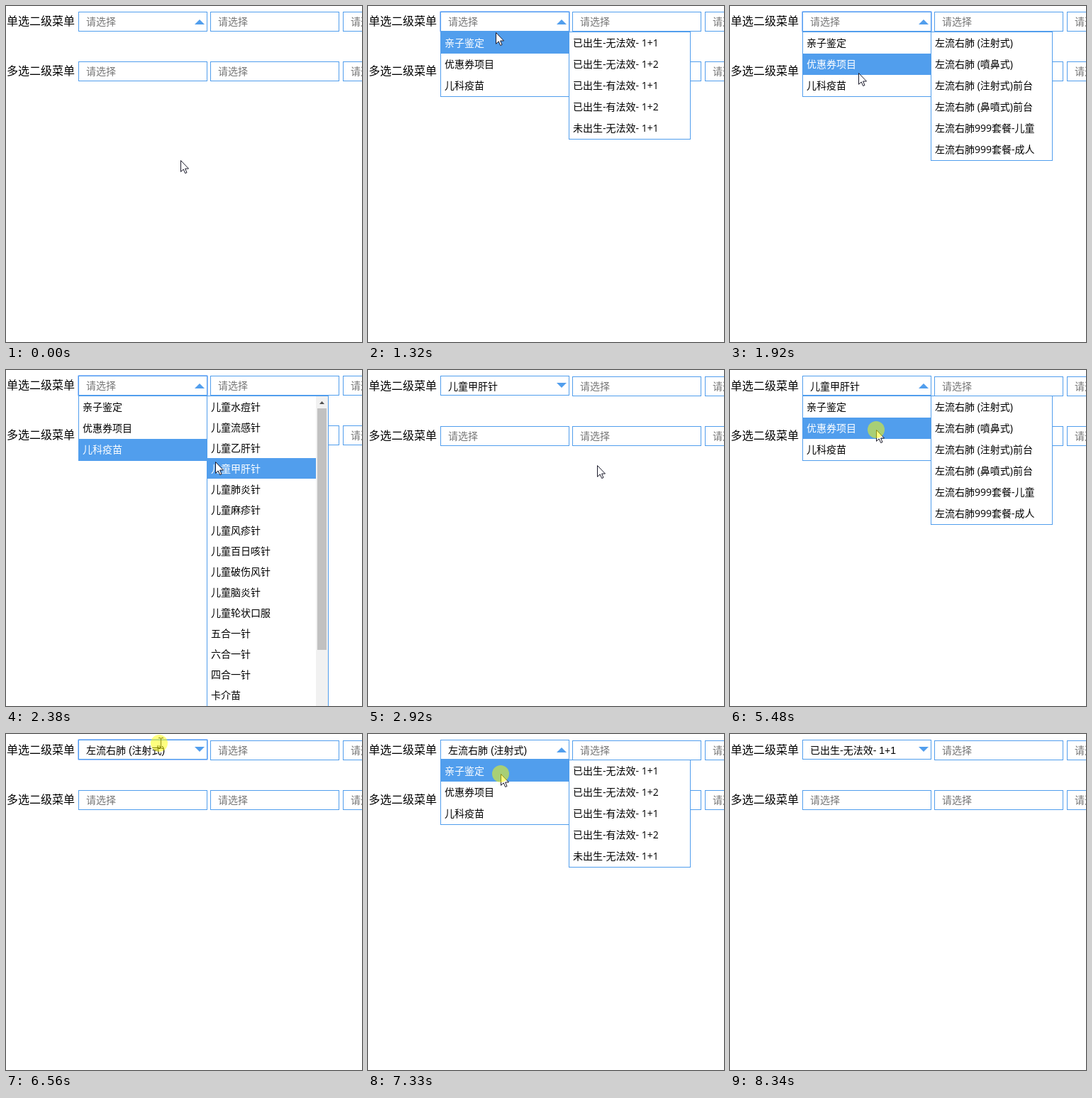
An HTML page that plays this animation: 502 by 473 pixels, repeating every 8.81 s.

```html
<!DOCTYPE html>
<html lang="zh-CN">
<head>
<meta charset="utf-8">
<title>二级菜单</title>
<style>
html, body { margin: 0; width: 100%; height: 100%; overflow: hidden; background: #fff; }
svg { display: block; }
text { white-space: pre; }
.label { font: 16px "Noto Sans CJK SC", "Noto Sans CJK", sans-serif; }
.field { font: 14px "Liberation Sans", "Noto Sans CJK SC", "Noto Sans CJK", sans-serif; }
.item { font: 14px "Open Sans", "Noto Sans CJK SC", "Noto Sans CJK", sans-serif; }
</style>
</head>
<body>
<svg id="stage" width="502" height="473" viewBox="0 0 502 473"></svg>
<script>
const LOOP = 8810, BLUE = '#519eed', GRAY = '#757575';
const stage = document.getElementById('stage');

const groups = ['亲子鉴定', '优惠券项目', '儿科疫苗'];
const children = [
  ['已出生-无法效- 1+1', '已出生-无法效- 1+2', '已出生-有法效- 1+1', '已出生-有法效- 1+2', '未出生-无法效- 1+1'],
  ['左流右肺 (注射式)', '左流右肺 (噴鼻式)', '左流右肺 (注射式)前台', '左流右肺 (鼻噴式)前台', '左流右肺999套餐-儿童', '左流右肺999套餐-成人'],
  ['儿童水痘针', '儿童流感针', '儿童乙肝针', '儿童甲肝针', '儿童肺炎针', '儿童麻疹针', '儿童风疹针', '儿童百日咳针',
   '儿童破伤风针', '儿童脑炎针', '儿童轮状口服', '五合一针', '六合一针', '四合一针', '卡介苗', '加强针']
];

// start, end, number of steps, destination of the pointer
const moves = [
  [70, 360, 5, 196, 36], [540, 670, 3, 180, 29],
  [1320, 1920, 8, 181, 94], [1990, 2150, 4, 253, 121], [2230, 2530, 5, 323, 134],
  [3140, 3700, 8, 223, 21], [4790, 5320, 8, 206, 84],
  [5930, 6480, 8, 218, 13], [6770, 6770, 1, 216, 24],
  [6870, 7100, 4, 187, 56], [7780, 8340, 8, 505, 480]
];
const clicks = [[2690, 2770], [3800, 3930], [5480, 5650], [6560, 6640], [7330, 7400]];
const opened = [[830, 2770], [3930, 5650], [6640, 7480]];
const focused = [[830, 2690], [3800, 5480], [6560, 7330]];
const values = [[7480, children[0][0]], [5650, children[1][0]], [2770, children[2][3]]];

const within = (spans, t) => spans.some(([a, b]) => t >= a && t < b);

function pointer(t) {
  let x = 246, y = 217;
  for (const [a, b, n, tx, ty] of moves) {
    if (t < a) break;
    const step = t >= b ? n : 1 + Math.floor((t - a) / (b - a) * (n - 1));
    x += Math.round((tx - x) * step / n);
    y += Math.round((ty - y) * step / n);
  }
  return { x, y };
}

const hoverRow = ({ x, y }) =>
  x > 102 && x < 284 && y >= 37 && y < 127 ? Math.floor((y - 37) / 30) : -1;

// The highlighted group stays until another one is hovered.
function activeGroup(t) {
  const here = hoverRow(pointer(t));
  if (here >= 0) return here;
  return t >= 5650 ? 1 : t >= 2150 ? 2 : -1;
}

const rect = (x, y, w, h, fill) => `<rect x="${x}" y="${y}" width="${w}" height="${h}" fill="${fill}"/>`;
const frame = (x, y, w, h) =>
  `<rect x="${x + .5}" y="${y + .5}" width="${w - 1}" height="${h - 1}" fill="#fff" stroke="${BLUE}"/>`;
const text = (kind, x, y, s, fill = '#000') => `<text class="${kind}" x="${x}" y="${y}" fill="${fill}">${s}</text>`;
const shape = (d, fill) => `<path d="${d}" fill="${fill}"/>`;
const input = (x, y) => frame(x, y, 182, 28) + text('field', x + 11, y + 19, '请选择', GRAY);
const focusRing =
  '<rect x="101.5" y="7.5" width="183" height="29" rx="1" fill="none" stroke="#4d90fe" stroke-opacity=".55"/>';

function fields(value, focus, up) {
  const dy = value ? 1 : 0;
  let out = text('label', 1, 27 + dy, '单选二级菜单') + text('label', 1, 97 + dy, '多选二级菜单');
  for (const x of [288, 475]) out += input(x, 8 + dy);
  for (const x of [102, 288, 475]) out += input(x, 78 + dy);
  out += frame(102, 8, 182, 28);
  if (focus) out += focusRing;
  out += text('field', 113, 27 + dy, value || '请选择', value ? '#000' : GRAY);
  return out + shape(up ? 'M266 26h14l-7-7z' : 'M266 18h14l-7 7z', BLUE);
}

function list(x, w, items, active, rowH = 30, innerW = w - 2) {
  let out = frame(x, 36, w, items.length * rowH + 2);
  items.forEach((s, i) => {
    const y = 37 + i * rowH;
    if (i === active) out += rect(x + 1, y, innerW, rowH, BLUE);
    out += text('item', x + 6, y + 20, s, i === active ? '#fff' : '#000');
  });
  return out;
}

function submenu(group, p) {
  const long = group === 2, rowH = long ? 29 : 30;
  const active = p.x > 284 ? Math.floor((p.y - 37) / rowH) : -1;
  let out = list(283, 172, children[group], active, rowH, long ? 153 : 170);
  if (long) {
    out += rect(437, 37, 17, 440, '#f1f1f1') + rect(439, 54, 13, 340, '#c1c1c1') +
      shape('M442 48h7l-3.5-4z', '#505050');
  }
  return out;
}

function cursor({ x, y }, open) {
  const overField = x > 102 && x < 470 && !(x > 284 && x < 288) &&
    ((y >= 8 && y <= 36) || (!open && y >= 79 && y < 107));
  const d = overField
    ? 'M-3 -7.5H-1Q.5 -7.5 .5 -6V6Q.5 7.5 -1 7.5H-3M4 -7.5H2Q.5 -7.5 .5 -6M.5 6Q.5 7.5 2 7.5H4'
    : 'M.5 .5V16.3L4.2 12.9L6.7 18.5L9 17.5L6.6 12H11.5Z';
  return `<path transform="translate(${x} ${y})" d="${d}" fill="${overField ? 'none' : '#fff'}" stroke="#1c1c2c"/>`;
}

function render(t) {
  const p = pointer(t), open = within(opened, t);
  const value = (values.find(([at]) => t >= at) || [])[1];
  let out = fields(value, within(focused, t), open || !value);
  if (open) {
    const group = activeGroup(t);
    out += list(102, 182, groups, group);
    if (group >= 0 && (hoverRow(p) >= 0 || p.x > 284)) out += submenu(group, p);
  }
  out += cursor(p, open);
  if (within(clicks, t)) {
    out += `<circle cx="${p.y < 36 ? p.x - 2 : p.x}" cy="${p.y}" r="12" fill="#ff0" fill-opacity=".5"/>`;
  }
  return out;
}

let last = '';
const start = performance.now();
function tick() {
  const next = render((performance.now() - start) % LOOP);
  if (next !== last) stage.innerHTML = last = next;
  requestAnimationFrame(tick);
}
tick();
</script>
</body>
</html>
```
